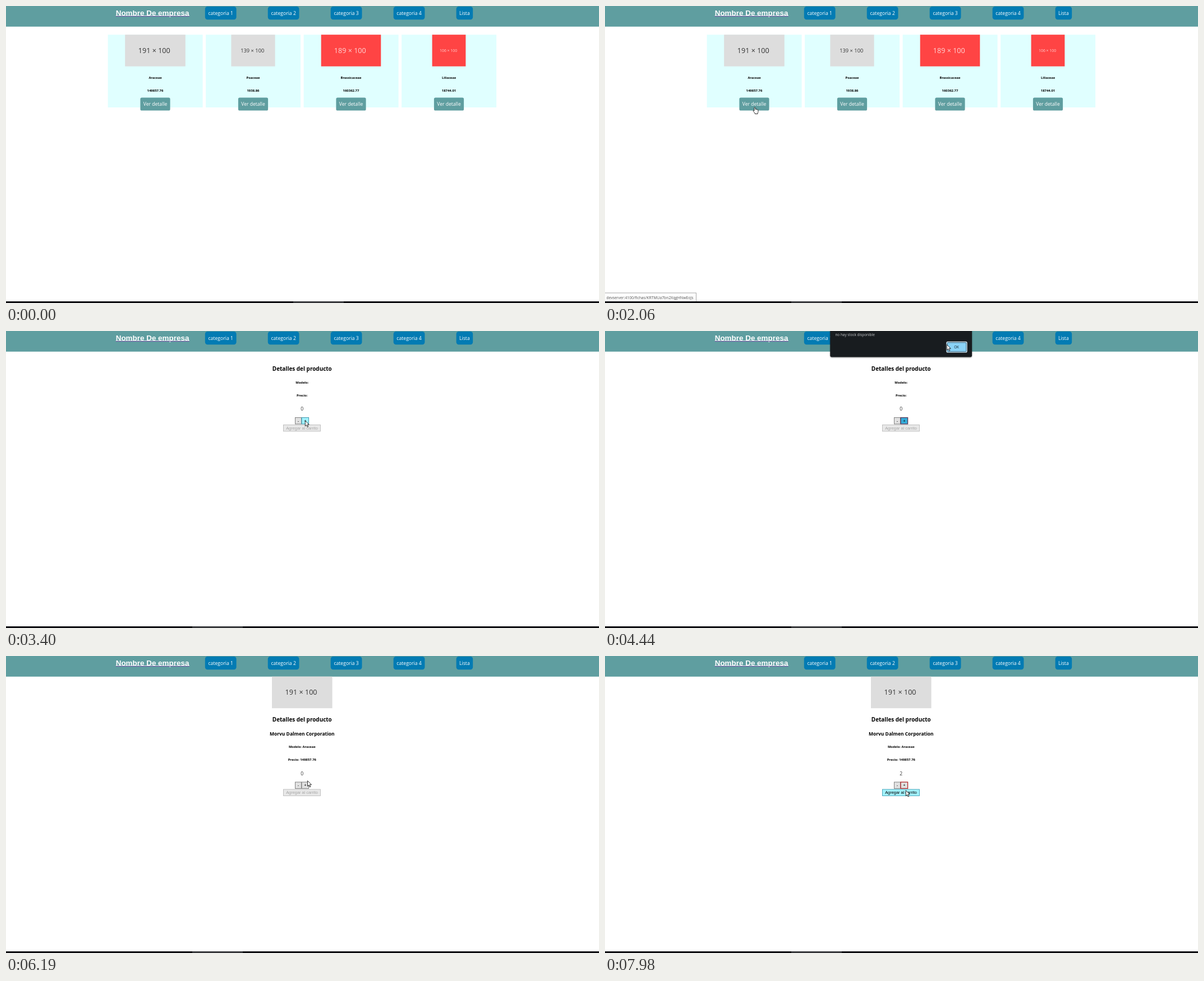
An HTML page that plays this animation: 1057x530 px, repeating every 8 s.

```html
<!DOCTYPE html>
<html lang="es">
<head>
<meta charset="utf-8">
<title>Tienda</title>
<style>
html, body { margin: 0; width: 100%; height: 100%; overflow: hidden; background: #fff; }
svg { display: block; width: 1057px; height: 530px; }
text { font-family: "Open Sans", "Noto Sans", sans-serif; white-space: pre; }
.arial { font-family: "Liberation Sans", Arial, sans-serif; }
#dialog { filter: drop-shadow(0 1px 1px rgba(0, 0, 0, .4)); }
</style>
</head>
<body>
<svg id="stage" viewBox="0 0 1057 530" xmlns="http://www.w3.org/2000/svg"></svg>
<script>
const LOOP = 8000;
const TEAL = '#5f9ea0', BLUE = '#037bb3';
const stage = document.getElementById('stage');

function add(parent, tag, attrs = {}) {
  const el = document.createElementNS('http://www.w3.org/2000/svg', tag);
  set(el, attrs);
  parent.append(el);
  return el;
}
function set(el, attrs) {
  for (const k in attrs) el.setAttribute(k, attrs[k]);
}
const show = (el, on) => el.setAttribute('visibility', on ? 'inherit' : 'hidden');
const group = (parent = stage, attrs) => add(parent, 'g', attrs);
const rect = (parent, x, y, width, height, fill, more) =>
  add(parent, 'rect', { x, y, width, height, fill, ...more });

// Text whose capitals are centred on y
function label(parent, text, x, y, size, fill = '#000', more = {}) {
  const el = add(parent, 'text', {
    x, y: y + size * .357, 'font-size': size, fill, 'text-anchor': 'middle', ...more
  });
  el.textContent = text;
  return el;
}
const bold = { 'font-weight': 700 };
const left = { 'text-anchor': 'start' };

// Header
rect(stage, 0, 0, 1057, 36.8, TEAL);
label(stage, 'Nombre De empresa', 195.7, 11.9, 13.45, '#fff', { ...bold, ...left, class: 'arial' });
rect(stage, 195.7, 16.9, 131, 1, '#fff');
rect(stage, 195.7, 17.9, 131, .9, '#55388f');
['categoria 1', 'categoria 2', 'categoria 3', 'categoria 4', 'Lista'].forEach((name, i) => {
  const w = i < 4 ? 55.8 : 29.6, x = 354.8 + i * 111.95;
  rect(stage, x, 1, w, 23.2, BLUE, { rx: 4.4 });
  label(stage, name, x + w / 2, 13.2, 8.65, '#fff');
});

// Product list
const list = group();
function picture(parent, cx, y, w, text, size, red) {
  rect(parent, cx - w / 2, y, w, 56.5, red ? '#ff4444' : '#ddd');
  label(parent, text, cx - 1.7 * size / 12.6, y + 28.3, size, red ? '#ffd3d3' : '#333');
}
[
  ['Araceae', '149857.76', 107.6, '191 × 100', 12.6, false],
  ['Poaceae', '1938.86', 78.2, '139 × 100', 9.3, false],
  ['Brassicaceae', '160362.77', 106.6, '189 × 100', 12.6, true],
  ['Liliaceae', '18744.01', 59.8, '106 × 100', 6.85, true]
].forEach(([name, price, w, size, px, red], i) => {
  const x = 181.6 + i * 174.5, cx = x + 84.4;
  rect(list, x, 51.2, 169, 129.8, '#e0ffff');
  picture(list, cx, 51.2, w, size, px, red);
  label(list, name, cx, 128.4, 5.75, '#000', bold);
  label(list, price, cx, 151.2, 5.95, '#000', bold);
  rect(list, cx - 26.6, 163.4, 53.2, 23.2, TEAL, { rx: 2.6 });
  label(list, 'Ver detalle', cx, 175.4, 8.55, '#fff');
});

// Product detail: empty first, then loaded
const CX = 527.8;
const detail = group();
const title = group(detail);
label(title, 'Detalles del producto', CX, 67, 9.95, '#000', bold);
const empty = group(detail);
label(empty, 'Modelo:', CX, 92, 5.8, '#000', bold);
label(empty, 'Precio:', CX, 114.5, 5.8, '#000', bold);
const loaded = group(detail);
picture(loaded, CX, 36.7, 107.6, '191 × 100', 12.6, false);
label(loaded, 'Morvu Dalmen Corporation', CX, 138.6, 8.48, '#000', bold);
label(loaded, 'Modelo: Araceae', CX, 162.3, 5.78, '#000', bold);
label(loaded, 'Precio: 149857.76', CX, 184.8, 5.93, '#000', bold);

const controls = group(detail);
const count = label(controls, '0', CX, 139, 8.6, '#333');
function button(x, y, w, h, text) {
  const box = rect(controls, x + .5, y + .5, w - 1, h - 1, '#e1e1e1', { stroke: '#777', 'stroke-width': .9 });
  const caption = label(controls, text, x + w / 2, y + h / 2, 7.4, '#000', { class: 'arial' });
  return { box, caption };
}
button(515, 154, 12, 12.4, '-');
const cart = button(494, 167, 67, 12.4, 'Agregar al carrito');
const plus = button(526.5, 154, 13.6, 12.4, '+');

// Alert
const dialog = group(stage, { id: 'dialog' });
rect(dialog, 401.3, -40, 252.8, 86.5, '#181c1f', { rx: 3 });
label(dialog, 'no hay stock disponible', 410.4, 6.6, 6.43, '#c4c6c8', left);
rect(dialog, 609, 19.4, 36, 18.6, '#8ad3f7', { rx: 1.8 });
const ring = group(dialog);
rect(ring, 610, 20.6, 34, 16.2, 'none', { stroke: '#24445a', 'stroke-width': .9, rx: 1.2 });
rect(ring, 608.9, 19.4, 36.2, 18.6, 'none', { stroke: '#e4f3fc', 'stroke-width': 1.1, rx: 2 });
label(dialog, 'OK', 626.6, 28.6, 6.3, '#13252f');

// Link address and bottom strip
const status = group();
const statusBox = rect(status, -.5, 512, 163, 16, '#fdfdfd', { stroke: '#aaa', 'stroke-width': 1 });
const statusText = label(status, '', 2.6, 520.2, 6.79, '#555', left);
rect(stage, 0, 527, 1057, 3, '#101114');
const task = rect(stage, 512, 527, 90, 3, '#393a3d');

// Pointers
const ink = { fill: '#fff', stroke: '#000', 'stroke-width': .8, 'stroke-linejoin': 'round' };
const pointer = group();
const arrow = add(pointer, 'path', { d: 'M0 0V9.8L2.3 7.7 3.9 11.3 5.5 10.6 3.9 7.1H7Z', ...ink });
const hand = add(pointer, 'path', {
  d: 'M0 1Q1.1-.6 2.1 1V4Q3.4 3.3 3.9 4.4 5.2 3.8 5.6 4.9 6.8 4.4 7 5.8V8.3Q7 9.6 6.1 10.6V12.2H1.2V10.8L-1.8 7.4Q-2 5.9-.9 5.9L0 6.8Z',
  ...ink
});

// Pointer moves: start, end, steps, then [progress, x, y]
const MOVES = [
  [500, 1200, 10, [0, 377, 526], [.45, 345, 270], [.8, 298, 40], [1, 288, 11]],
  [1360, 2060, 10, [0, 288, 11], [.3, 280, 60], [.75, 268, 165], [1, 266, 180.3]],
  [2380, 2610, 4, [0, 266, 180.3], [1, 210, 194]],
  [2780, 3250, 7, [0, 210, 194], [.5, 400, 180], [1, 533.3, 160]],
  [4120, 4900, 11, [0, 533.3, 160], [.2, 560, 110], [5 / 11, 609.3, 24.2], [1, 623.8, 29.5]],
  [5880, 6350, 7, [0, 623.8, 29.5], [.3, 590, 110], [5 / 7, 537.5, 222.6], [1, 534, 227]],
  [7240, 7480, 4, [0, 534, 227], [1, 536, 243]],
  [7900, 7980, 2, [0, 536, 243], [1, 536.2, 239.8]]
];

// Index of the current step, -1 before the first
const stepAt = (t, a, b, n) =>
  t < a ? -1 : Math.min(n - 1, Math.floor((t - a) / (b - a) * (n - 1) + .12));

function pointerAt(t) {
  const [a, b, n, ...path] = MOVES.findLast(m => t >= m[0]) || MOVES[0];
  const p = (stepAt(t, a, b, n) + 1) / n;
  const i = Math.max(1, path.findIndex(q => q[0] >= p - 1e-6));
  const [p0, x0, y0] = path[i - 1], [p1, x1, y1] = path[i];
  const k = (p - p0) / (p1 - p0);
  return [x0 + (x1 - x0) * k, y0 + (y1 - y0) * k];
}

// Alert [opacity, offset] for each step
const OPENING = [[0, 0], [.4, -12], [.8, -5], [.95, -2], [.99, -.5], [1, 0]];
const CLOSING = [[1, 0], [1, 0], [1, -.5], [.9, -3.6], [.45, -10], [0, 0]];
function alertAt(t) {
  if (t < 3400) return [0, 0];
  return t < 5150 ? OPENING[stepAt(t, 3400, 3800, 6)] : CLOSING[stepAt(t, 5150, 5550, 6)];
}

const between = (v, a, b) => v >= a && v < b;

function render(t) {
  const [x, y] = pointerAt(t);
  const inDetail = t >= 2380, full = t >= 5310;
  const n = t >= 7080 ? 2 : t >= 6590 ? 1 : 0;
  const shift = full ? 70.5 : 0;

  show(list, !inDetail);
  show(detail, inDetail);
  show(empty, !full);
  show(loaded, full);
  set(title, { transform: `translate(0 ${full ? 46.6 : 0})` });
  set(controls, { transform: `translate(0 ${shift})` });
  count.textContent = n;

  const [alpha, dy] = alertAt(t);
  set(dialog, { opacity: alpha, transform: `translate(0 ${dy})` });
  show(dialog, alpha > 0);
  show(ring, t < 5150);

  const free = alpha === 0;
  const over = (x0, x1, y0, y1) => free && between(x, x0, x1) && between(y - shift, y0, y1);
  const pressed = between(t, 3480, 5310) || between(t, 6500, 6590) || between(t, 6910, 7080);
  const focused = n > 0;
  const plusOver = over(526.5, 540, 154, 166.5);
  set(plus.box, {
    fill: pressed ? '#35acd9' : plusOver ? '#a2f2fc' : '#e1e1e1',
    stroke: pressed ? '#58395a' : focused ? '#b3282d' : plusOver ? '#2f8fa8' : '#777',
    'stroke-width': focused || pressed ? 1.3 : .9
  });
  const cartOver = focused && over(494, 561, 167, 179.5);
  set(cart.box, {
    fill: cartOver ? '#a2f2fc' : focused ? '#e1e1e1' : '#e8e8e8',
    stroke: cartOver ? '#3f9fb5' : focused ? '#777' : '#bbb'
  });
  set(cart.caption, { fill: focused ? '#000' : '#a6a6a6' });

  const onHome = !inDetail && y < 20;
  const onMore = !inDetail && between(x, 239, 292.5) && between(y, 163.4, 186.6);
  const fading = between(t, 2380, 2530);
  show(status, onHome || onMore || fading);
  set(status, { opacity: fading ? .6 : 1 });
  statusText.textContent = onHome ? 'devserver:4100' : 'devserver:4100/fichas/KRTMUa7bn2XqgHNwEoJs';
  set(statusBox, { width: onHome ? 58 : 163 });

  set(task, { x: t < 500 ? 512 : 332 });
  show(pointer, t >= 500);
  show(hand, onHome || onMore);
  show(arrow, !(onHome || onMore));
  set(pointer, { transform: `translate(${x} ${y})` });
}

function frame() {
  render(performance.now() % LOOP);
  requestAnimationFrame(frame);
}
frame();
</script>
</body>
</html>
```
